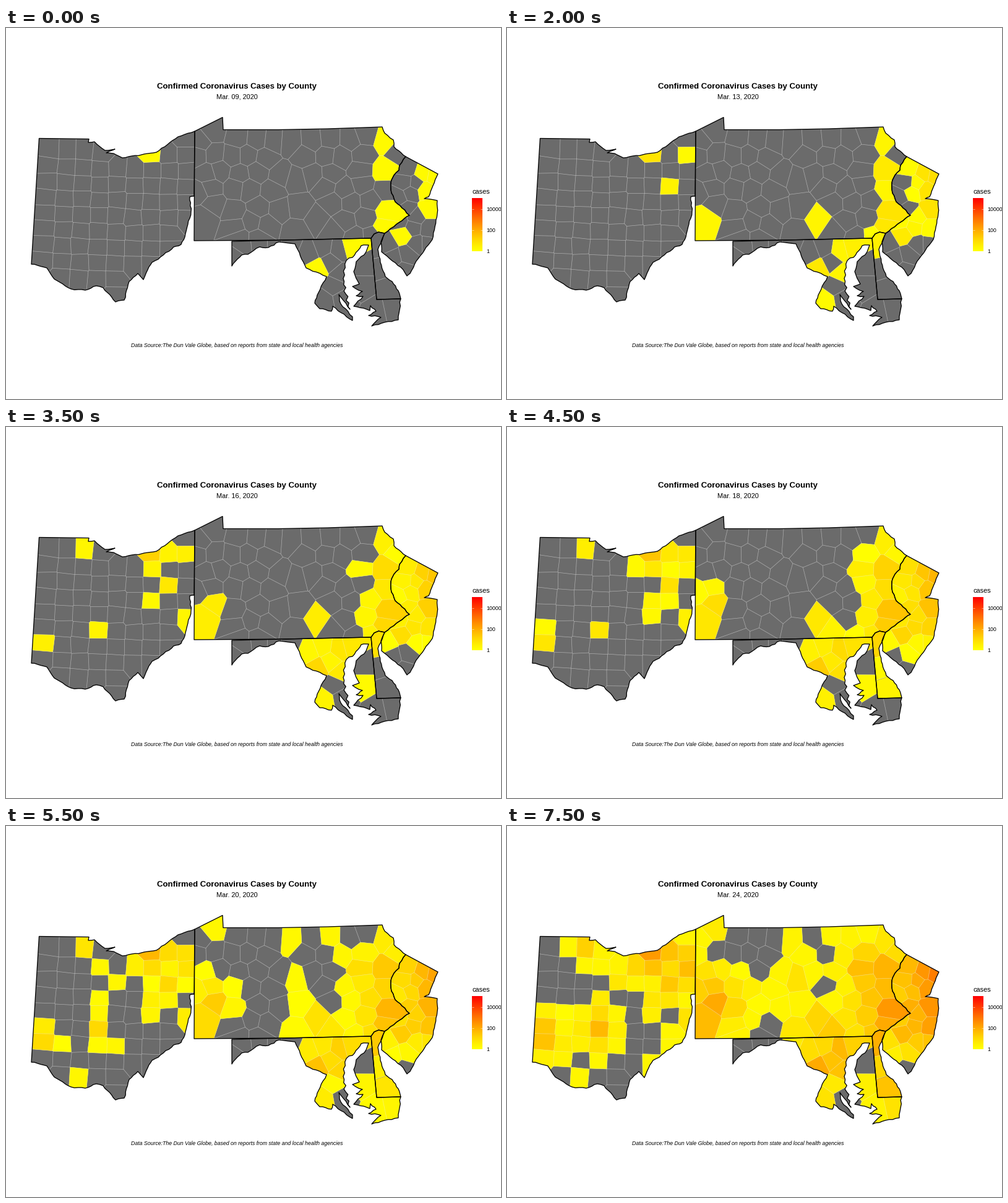
A matplotlib script that plays this animation: 800x600 px, repeating every 8000 ms.

```python
import numpy as np
import matplotlib.pyplot as plt
from matplotlib.animation import FuncAnimation
from matplotlib.collections import PolyCollection
from matplotlib.patches import Polygon
from matplotlib.path import Path

DAYS = 16
PX = 0.72  # points per pixel at 100 dpi
GRAY = "#6b6b6b"
rng = np.random.default_rng(9)
plt.rcParams["font.family"] = "Liberation Sans"

fig = plt.figure(figsize=(8, 6), dpi=100, facecolor="white")
ax = fig.add_axes([0, 0, 1, 1])


# ---- outlines: straight borders, and shores that wander between key points ----
def line(*xy):
    return np.reshape(xy, (-1, 2)).astype(float)


def wander(amp, *xy):
    keys = line(*xy)
    path = [keys[0]]
    for a, b in zip(keys, keys[1:]):
        along = b - a
        size = np.hypot(*along)
        side = np.array([-along[1], along[0]]) / size
        n = int(np.ceil(size / 6))
        for k in range(1, n):
            path.append(a + along * k / n + side * rng.uniform(-amp, amp))
        path.append(b)
    return np.array(path)


river = wander(0.8, 646, 208, 636, 222, 635, 230, 627, 238, 622, 250, 623, 267, 629, 281,
               640, 291, 652, 303, 636, 314, 612, 332)
arc = line(612, 332, 602, 330, 595, 333, 590, 340)

ohio = np.vstack([
    line(53.5, 178.5, 134, 179.5),
    wander(0.6, 133, 185, 143, 184, 160, 198, 176, 196, 162, 202, 174, 203, 188, 210,
           219, 205, 243, 201, 278, 176, 305, 167),
    wander(1, 304, 272, 297, 273, 299, 297, 289, 338, 283, 350, 271, 354, 246, 374, 236, 379,
           229, 391, 222, 407, 213, 397, 199, 410, 191, 440, 177, 443, 157, 420, 146, 417,
           128, 424, 105, 422, 78, 406, 66, 388, 41, 382)])

penn = np.vstack([
    line(304, 344, 305, 167, 350, 144.5, 351, 164.5, 440, 164.5, 520, 163, 608, 160),
    wander(0.8, 608, 160, 612, 170, 626, 181, 627, 192, 646, 208),
    river, arc, line(450, 343)])

jersey = np.vstack([
    line(698, 236),
    wander(0.7, 698, 236, 690, 255, 683, 273, 676, 276, 697, 279, 697, 300, 689, 342,
           663, 377, 653, 397, 648, 401, 642, 391, 607, 362, 606, 346, 612, 332),
    river[::-1]])

delaware = np.vstack([
    arc, line(599, 439, 638, 438),
    wander(0.8, 638, 438, 634, 425, 624, 410, 613, 402, 605, 379, 601, 358, 612, 332)])

maryland = np.vstack([
    line(365, 345, 450, 343, 590, 340, 599, 439, 638, 438),
    wander(1.2, 638, 438, 634, 472, 591, 482, 606, 468, 586, 465, 598, 458, 589, 449, 588, 457,
           562, 450, 577, 434, 566, 433, 576, 426, 560, 418, 571, 414, 562, 394, 566, 378,
           582, 362, 586, 351, 574, 352),
    wander(2.5, 572, 356, 560, 371, 550, 376, 545, 405, 549, 430, 556, 455),
    wander(1, 556, 455, 538, 431, 541, 446, 560, 467, 560, 473, 528, 450, 526, 458, 507, 454,
           499, 445, 505, 428, 518, 402, 485, 388, 467, 349, 441, 346, 424, 355, 410, 354,
           391, 366, 381, 367, 365, 385)])


# ---- counties: nearest-seed cells on a grid bent like the map projection ----
def bend(u, v):
    x = 304 + (u - 304) * (1 + 0.00023 * (v - 280))
    return np.stack([x, v - 0.00012 * (u - 345) ** 2], axis=-1)


def make_seeds(outline, hubs, step, tidy):
    cols, rows = np.meshgrid(np.arange(-20, 30), np.arange(-3, 20))
    u = 291 + step * (cols + (0 if tidy else 0.5) * (rows % 2))
    grid = bend(u, 180.5 + step * 0.91 * rows).reshape(-1, 2)
    grid += rng.uniform(-1, 1, grid.shape) * step * (0.06 if tidy else 0.2)
    grid = grid[Path(outline).contains_points(grid)]
    if tidy:
        return grid
    gap = np.linalg.norm(grid[:, None] - hubs[None, :, :2], axis=2).min(axis=1)
    return np.vstack([hubs[:, :2], grid[gap > 0.75 * step]])


def cell(i, seeds):
    poly = [np.array(p, float) for p in ((0, 0), (800, 0), (800, 600), (0, 600))]
    for other in np.delete(seeds, i, axis=0):
        normal = other - seeds[i]
        limit = normal @ (other + seeds[i]) / 2
        kept = []
        for a, b in zip(poly, poly[1:] + poly[:1]):
            da, db = limit - normal @ a, limit - normal @ b
            if da >= 0:
                kept.append(a)
            if da * db < 0:
                kept.append(a + (b - a) * da / (da - db))
        poly = kept
    return np.array(poly)


class State:
    """Cases grow from hubs (x, y, first day, final log10 cases) and fade with distance."""

    def __init__(self, outline, step, reach, *hubs, tidy=False):
        self.hubs = np.array(hubs)
        seeds = make_seeds(outline, self.hubs, step, tidy)
        away = np.linalg.norm(seeds[:, None] - self.hubs[None, :, :2], axis=2)
        homes = seeds[away.argmin(axis=0)]
        dist = np.linalg.norm(seeds[:, None] - homes[None], axis=2)
        self.loss = dist / reach + rng.normal(0, 0.12, dist.shape) * (dist > 0)
        self.spark = rng.uniform(9, 40, len(seeds))  # stray first cases

        shapes = [cell(i, seeds) for i in range(len(seeds))]
        land = ax.add_patch(Polygon(outline, fc=GRAY, ec="none", zorder=1))
        self.fill = PolyCollection(shapes, lw=0.5 * PX, zorder=2)
        lines = PolyCollection(shapes, fc="none", ec=(1, 1, 1, 0.25), lw=0.7 * PX, zorder=3)
        for part in (self.fill, lines):
            ax.add_collection(part)
            part.set_clip_path(land)
        ax.add_patch(Polygon(outline, fc="none", ec="black", lw=1.3 * PX,
                             joinstyle="round", zorder=4))

    def paint(self, day):
        first, final = self.hubs[:, 2], self.hubs[:, 3]
        level = 0.2 + (final - 0.2) * (day - first) / (DAYS - 1 - first)
        level = np.where(day >= first, level, -np.inf)
        cases = (level - self.loss).max(axis=1)
        cases = np.maximum(cases, np.where(day >= self.spark, 0.3, -np.inf))
        colors = [(*heat(c / 5), 1) if c >= 0 else (0, 0, 0, 0) for c in cases]
        self.fill.set_facecolor(colors)
        self.fill.set_edgecolor(colors)


def heat(t):
    return 1, 1 - t ** 1.2, 0


states = [
    State(ohio, 28, 30, (237, 207, 0, 2.3), (253, 255, 2, 1.4), (291, 215, 4, 1.2),
          (57, 358, 5, 1.5), (278, 320, 5, 0.8), (154, 320, 6, 1.7), (118, 190, 6, 1.2),
          (247, 285, 6, 0.7), (288, 241, 8, 1.6), (219, 296, 8, 0.5), (75, 318, 9, 1.4),
          (183, 254, 10, 0.7), (147, 275, 11, 0.6), tidy=True),
    State(penn, 30, 40, (615, 182, 0, 0.7), (612, 232, 0, 1.8), (615, 297, 0, 2.35),
          (611, 322, 0, 2), (502, 309, 2, 1.1), (322, 305, 3, 1.2), (613, 261, 3, 1.6),
          (335, 286, 5, 2), (573, 230, 7, 1.6), (530, 328, 8, 1.3), (335, 168, 10, 0.6),
          (459, 185, 10, 0.4), (368, 298, 10, 0.9), (468, 245, 11, 0.8), (469, 328, 11, 0.7)),
    State(jersey, 22, 35, (691, 238, 0, 2.85), (674, 235, 0, 2.3), (677, 262, 0, 2.3),
          (684, 292, 0, 2.4), (641, 333, 0, 1.7), (657, 322, 3, 1.75), (684, 325, 4, 2.2),
          (648, 294, 5, 1.9)),
    State(delaware, 60, 5, (598, 355, 2, 1.9), (605, 388, 9, 1.1), (616, 422, 8, 1.5)),
    State(maryland, 26, 18, (557, 355, 0, 1.2), (504, 388, 0, 2), (538, 360, 3, 1.7),
          (541, 398, 3, 1.5), (514, 443, 4, 0.8), (512, 356, 5, 1), (491, 364, 6, 0.9),
          (524, 378, 6, 1.5), (573, 415, 7, 0.5), (624, 455, 10, 0.8), (600, 460, 11, 0.4),
          (457, 350, 12, 0.6)),
]


# ---- text and legend ----
def label(x, y, text, size, **style):
    return ax.text(x, y, text, fontsize=size * PX, va="baseline", **style)


label(373.5, 98, "Confirmed Coronavirus Cases by County", 13.2, ha="center", weight="bold")
date = label(373.5, 114, "", 11, ha="center")
label(373.5, 516, "Data Source:The Dun Vale Globe, based on reports from state and local"
      " health agencies", 8.8, ha="center", style="italic")
label(753, 268, "cases", 11)

ramp = np.array([[heat(t)] for t in np.linspace(1, 0, 86)])
ax.imshow(ramp, extent=(753, 770, 361, 275), aspect="auto", zorder=2)
for i, n in enumerate(("1", "100", "10000")):
    y = 360.5 - 33.9 * i
    label(776, y + 3.2, n, 8.8)
    for x in (753, 766.6):
        ax.plot([x, x + 3.4], [y, y], color="white", lw=0.5 * PX, solid_capstyle="butt", zorder=3)

ax.set_xlim(0, 800)
ax.set_ylim(600, 0)
ax.axis("off")


def draw(day):
    date.set_text(f"Mar. {9 + day:02d}, 2020")
    for state in states:
        state.paint(day)
    return [date] + [state.fill for state in states]


anim = FuncAnimation(fig, draw, frames=DAYS, interval=500, repeat=True)
plt.show()
```
